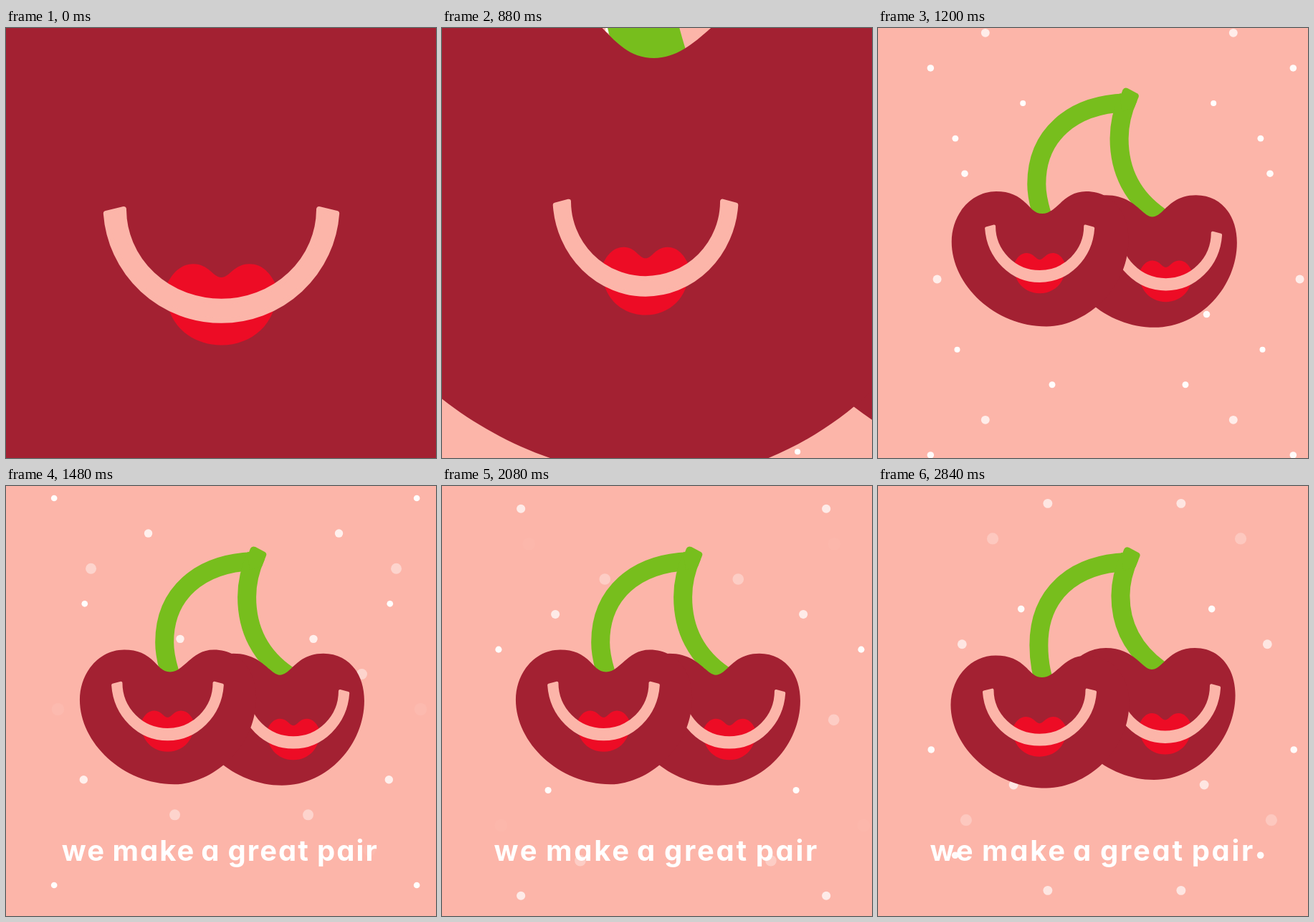
Animation, 600 px wide and 600 px high, one loop 2.88 s. Source, as an HTML page:

```html
<!DOCTYPE html>
<html lang="en">
<head>
<meta charset="utf-8">
<title>Cherry pair</title>
<style>
  html, body { margin: 0; width: 100%; height: 100%; overflow: hidden; background: #fcb5a9; }
  svg { display: block; width: 100vw; height: 100vh; }
  .body { fill: #a32132; }
  .lips { fill: #ed0c25; }
  .smile { fill: #fcb5a9; stroke: #fcb5a9; stroke-width: 4; stroke-linejoin: round; }
  .stem { fill: none; stroke: #77be1d; stroke-width: 26; }
  .cap { fill: #77be1d; }
  #dots { fill: #fff; }
  #words {
    fill: #fff; text-anchor: middle;
    font: 700 40px Inter, Lato, sans-serif;
    font-feature-settings: "cv11";
  }
</style>
</head>
<body>
<svg viewBox="0 0 600 600">
  <defs>
    <g id="face">
      <path class="lips" d="M225.5 322.5C220 322.5 217 313 207 313C198 313 193 320 189.5 327C186 352 203 370.5 225.5 370.5C248 370.5 265 352 261.5 327C258 320 253 313 244 313C234 313 231 322.5 225.5 322.5Z"/>
      <path class="smile" d="M149.2 277.3A76.5 81.5 0 0 0 301.8 277.3L290.5 274.3A65 65.3 0 0 1 160.5 274.3Z"/>
    </g>
  </defs>
  <rect width="600" height="600" fill="#fcb5a9"/>
  <g id="dots"></g>
  <g id="camera">
    <path id="stemL" class="stem"/>
    <path id="stemR" class="stem"/>
    <path id="cap" class="cap" d="M337 97L341 87Q343 83 348 85L361 92Q364 94 363 97L357 112L340 117Z"/>
    <g id="right">
      <path class="body" d="M382 264C368 264 358 234 317 234C285 234 255 260 255 297C255 366 320 418 385 418C450 418 500 360 500 300C500 262 478 234 443 234C405 234 398 264 382 264Z"/>
      <use href="#face" x="175.5" y="12"/>
    </g>
    <g id="left">
      <path class="body" d="M229 259C219 259 214 252 207 245C196 234 184 228 165 228C130 228 103 260 103 298C103 358 163 416 235 416C287 416 349 366 349 295C349 252 322 228 290 228C258 228 249 259 229 259Z"/>
    </g>
  </g>
  <use id="leftFace" href="#face"/>
  <g id="words"></g>
</svg>
<script>
const LOOP = 2880, STEP = 40, ROWS = 11, TILE = 540;
const NS = 'http://www.w3.org/2000/svg';
const $ = id => document.getElementById(id);
const clamp = v => Math.min(1, Math.max(0, v));
const set = (el, attrs) => { for (const k in attrs) el.setAttribute(k, attrs[k]); };
const add = (tag, parent) => parent.appendChild(document.createElementNS(NS, tag));
const wave = (t, peak, period) => Math.cos((t - peak) / period * 2 * Math.PI);

// Each row holds two dots, mirrored about the middle; a few spill past the edge
const dots = [];
for (let row = 0; row < ROWS; row++) {
  const reach = 60 + (153 + 80 * row) % 200;
  for (const side of [-1, 1]) {
    dots.push({
      x: 328 + side * reach,
      y: 370 + row * TILE / ROWS,
      big: 2020 - 150 * (row % 4),
      sway: 2200 + 400 * row,
      els: [add('circle', $('dots')), add('circle', $('dots'))]
    });
  }
}

const words = Object.entries({ we: 102.5, make: 203, a: 284.5, great: 367.5, pair: 480.5 })
  .map(([text, x]) => {
    const el = add('text', $('words'));
    el.textContent = text;
    set(el, { y: 523 });
    return { el, x };
  });

// Ballistic bob: decelerate upwards, accelerate downwards
function bob(t) {
  const low = 10.7, height = 13.2, rise = 375, fall = 225;
  const u = t < 775 ? Math.max(0, t - 340) * rise / 435 : (t + 200) % 600;
  const off = u < rise ? 1 - u / rise : (u - rise) / fall;
  return low - height * (1 - off * off);
}

// Share of the zoom still to go, from 1 (close-up) to 0
function closeness(t) {
  const p = clamp((t - 640) / 605);
  return p < 0.5 ? 1 - 4 * p ** 3 : 4 * (1 - p) ** 3;
}

const squash = (x, y, b) =>
  `translate(${x} ${y + b}) scale(${1 + 0.0015 * b} ${1 - 0.002 * Math.max(0, b)}) translate(${-x} ${-y})`;

const curve = points =>
  'M' + points.map(([x, y], i) => (i === 1 ? 'C' : '') + x + ' ' + y).join(' ');

function drawStems(b) {
  const tx = 0.3 * b, ty = 0.12 * b, bend = 0.42 * b;
  set($('cap'), { transform: `translate(${tx} ${ty})` });
  set($('stemL'), { d: curve([
    [344 + tx, 105 + ty], [270 + tx, 108 + ty], [221 + bend, 150 + ty], [221 + bend, 218 + b / 2],
    [221 + bend, 235 + b / 2], [225 + bend / 2, 250 + b], [231 + bend / 2, 268 + b]
  ]) });
  set($('stemR'), { d: curve([
    [349 + tx, 97 + ty], [340 + tx, 117 + ty], [336 + tx, 135 + ty], [336 + tx, 155 - b / 4],
    [336 + tx, 200 - b / 2], [355 + tx, 238 - b], [393, 264 - b]
  ]) });
}

function drawCherries(t) {
  const b = bob(t), k = closeness(t);
  const zoom = 5.8 ** k;
  const cx = 226 + 87 * k - 12 * k * k, cy = 330 - 32 * k;
  set($('camera'), { transform: `translate(${cx} ${cy}) scale(${zoom}) translate(-226 -330)` });
  set($('left'), { transform: squash(229, 261, b) });
  set($('right'), { transform: squash(382, 264, -b) });
  drawStems(b);

  // The left face shrinks less than its cherry
  const size = zoom * (1 - 0.645 * Math.sqrt(k));
  const fy = cy + 13 * zoom + b * Math.min(zoom, 1.4);
  set($('leftFace'), { transform: `translate(${cx - 0.5} ${fy}) scale(${size * (1 + 0.002 * b)} ${size * (1 - 0.004 * b)}) translate(-225.5 -343)` });
}

function drawDots(t) {
  for (const d of dots) {
    const y = (d.y - t * 0.139 + TILE) % TILE;
    const grow = (1 + wave(t, d.big, 1300)) / 2;
    const cx = d.x + 8 * wave(t, d.sway, 1130);
    const look = { cx, r: 4 + 5 * grow, opacity: 1 - grow ** 1.5 };
    set(d.els[0], { ...look, cy: y });
    set(d.els[1], { ...look, cy: y < TILE / 2 ? y + TILE : y - TILE });
  }
}

function drawWords(t) {
  const left = 1 - clamp((t - 1200) / 800);
  const spread = 1 - 0.06 * left * left;
  const gap = 2.7 - 26 * (1 - spread);
  set($('words'), { opacity: clamp((t - 1200) / 240), 'letter-spacing': gap });
  for (const w of words) set(w.el, { x: 297 + (w.x - 297) * spread + gap / 2 });
}

function frame() {
  const t = Math.floor(performance.now() % LOOP / STEP) * STEP;
  drawCherries(t);
  drawDots(t);
  drawWords(t);
  requestAnimationFrame(frame);
}
frame();
</script>
</body>
</html>
```
